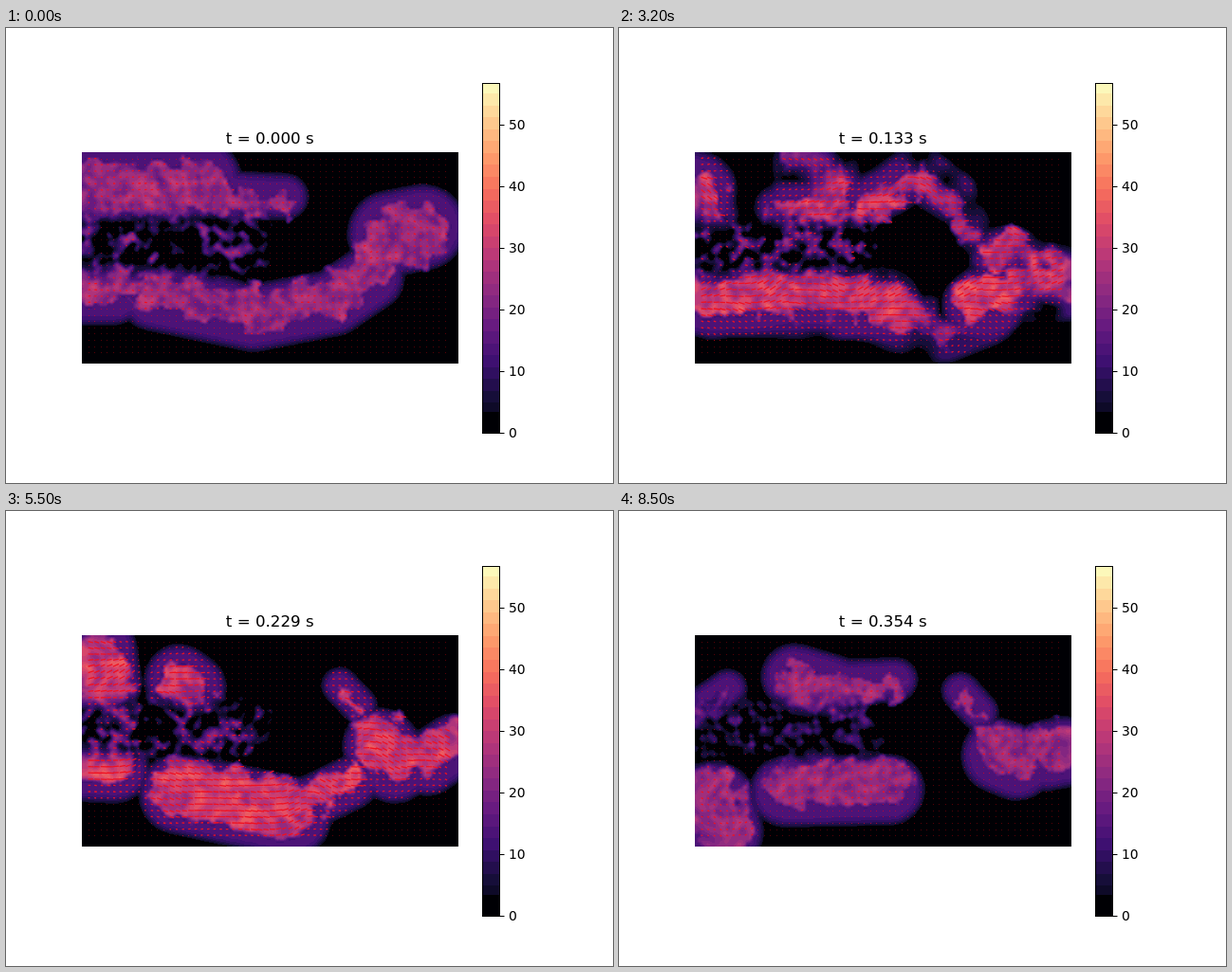
An HTML page with a canvas for the animation above (8600 ms loop, 640x480 px).

```html
<!DOCTYPE html>
<html lang="en">
<head>
<meta charset="utf-8">
<title>Velocity field</title>
<style>
  html, body { margin: 0; width: 100%; height: 100%; overflow: hidden; background: #fff; }
  canvas { position: absolute; left: 80px; top: 131px; }
  svg { position: absolute; left: 0; top: 0; }
  text { font: 13.89px "DejaVu Sans", sans-serif; }
  #clock { font-size: 16.67px; text-anchor: middle; }
</style>
</head>
<body>
<canvas id="plot" width="397" height="223"></canvas>
<svg id="chart" width="640" height="480"><text id="clock" x="278.2" y="122">t = 0.000 s</text></svg>
<script>
const FRAMES = 86, STEP = 100, RATE = 240;
const LEFT = 80, UPPER = 131, WIDTH = 397, HEIGHT = 223, CELL = 3, MIDDLE = 228;
const COLS = Math.ceil(WIDTH / CELL), ROWS = Math.ceil(HEIGHT / CELL);
const TOP = 56.7, BLACK = 3.45, BAND = 1.926, OFFSET = 1.14, GAIN = 4.4;

const clamp = (v, lo = 0, hi = 1) => Math.min(hi, Math.max(lo, v));
const mix = (a, b, u) => a + (b - a) * u;
const smooth = u => u * u * (3 - 2 * u);

// Colour scale
const stops = ['000004', '140e36', '3b0f70', '641a80', '8c2981', 'b73779',
  'de4968', 'f7705c', 'fe9f6d', 'fecf92', 'fcfdbf']
  .map(hex => [0, 2, 4].map(i => parseInt(hex.slice(i, i + 2), 16)));

function magma(value) {
  const p = clamp(value / TOP) * 10, i = Math.min(9, Math.floor(p));
  return stops[i].map((c, k) => Math.round(mix(c, stops[i + 1][k], p - i)));
}
const edge = k => OFFSET + k * BAND;
const banded = v => v < BLACK ? stops[0] : magma(edge(Math.floor((v - OFFSET) / BAND) + 0.5));
const palette = Array.from({ length: 256 }, (_, g) => banded(g / GAIN));

// Smooth value noise in x, y and time
function hash(x, y, z) {
  let h = Math.imul(x, 374761393) + Math.imul(y, 668265263) + Math.imul(z, 1274126177);
  h = Math.imul(h ^ (h >>> 13), 1274126177);
  return ((h ^ (h >>> 16)) >>> 0) / 4294967296;
}
function noise(x, y, z) {
  const i = Math.floor(x), j = Math.floor(y), k = Math.floor(z);
  const u = smooth(x - i), v = smooth(y - j), w = smooth(z - k);
  const layer = n => mix(
    mix(hash(i, j, n), hash(i + 1, j, n), u),
    mix(hash(i, j + 1, n), hash(i + 1, j + 1, n), u), v);
  return mix(layer(k), layer(k + 1), w);
}
// Turned axes hide the lattice
const grainAt = (x, y, z, size) => noise((x * 0.8 + y * 0.6) / size, (y * 0.8 - x * 0.6) / size, z);

function canvasOf(width, height) {
  const canvas = document.createElement('canvas');
  canvas.width = width;
  canvas.height = height;
  return canvas.getContext('2d', { willReadFrequently: true });
}

// Mask of thick ridges; rims are [extra width, strength], weakest first
function maskOf(ridges, shift, rims) {
  const c = canvasOf(COLS, ROWS);
  c.fillRect(0, 0, COLS, ROWS);
  c.scale(1 / CELL, 1 / CELL);
  c.translate(-LEFT, -UPPER);
  c.lineJoin = c.lineCap = 'round';
  for (const [extra, strength] of rims) {
    c.strokeStyle = `rgb(${strength * 255},0,0)`;
    for (const [width, ...points] of ridges) {
      const dy = points[1] < MIDDLE ? -shift : shift;
      c.lineWidth = width + extra;
      c.beginPath();
      for (let i = 0; i < points.length; i += 2) c.lineTo(points[i], points[i + 1] + dy);
      c.stroke();
    }
  }
  const { data } = c.getImageData(0, 0, COLS, ROWS);
  return Float32Array.from({ length: COLS * ROWS }, (_, i) => data[i * 4] / 255);
}

// A pose is a few fast streams, each a width and the points of its centre line
const pose = (frame, ...ridges) => ({
  frame,
  core: maskOf(ridges, 0, [[4, 0.6], [-2, 1]]),
  halo: maskOf(ridges, 8, [[32, 0.3], [27, 0.6], [21, 0.85], [14, 1]]),
});

const poses = [
  pose(0, [58, 80, 172, 205, 168], [20, 215, 182, 295, 186], [50, 80, 266, 112, 266],
    [42, 155, 276, 260, 298, 345, 282, 385, 255], [62, 405, 225, 440, 218]),
  pose(10, [66, 112, 180, 165, 180], [40, 190, 195, 255, 200], [46, 80, 262, 170, 275, 305, 287],
    [54, 382, 205, 402, 240], [40, 425, 262, 470, 270], [14, 348, 186, 362, 190]),
  pose(23, [48, 80, 175, 98, 195], [30, 170, 200, 250, 198, 315, 160, 350, 185],
    [14, 350, 185, 390, 245], [50, 80, 278, 280, 284], [46, 378, 284, 470, 265]),
  pose(41, [64, 207, 155, 212, 190], [22, 235, 202, 288, 180], [26, 95, 168, 95, 220],
    [42, 80, 288, 170, 276, 245, 278, 300, 302], [48, 340, 308, 385, 290, 412, 238], [38, 430, 245, 470, 252]),
  pose(55, [48, 100, 155, 105, 190], [46, 183, 186, 195, 195], [44, 85, 262, 115, 264],
    [58, 183, 290, 230, 300, 300, 315], [52, 395, 240, 410, 260], [40, 445, 258, 472, 240],
    [28, 320, 300, 365, 278], [10, 352, 192, 372, 213]),
  pose(71, [28, 170, 200, 185, 185], [24, 292, 180, 250, 175, 264, 225], [24, 90, 200, 115, 205],
    [84, 110, 310, 200, 310], [52, 230, 290, 285, 285], [54, 400, 224, 430, 232], [36, 455, 250, 468, 250]),
  pose(85, [42, 185, 183, 225, 195], [18, 235, 188, 292, 186], [12, 85, 215, 115, 195],
    [60, 100, 300, 108, 330], [46, 175, 288, 285, 286], [50, 400, 250, 420, 258],
    [46, 450, 250, 470, 246], [12, 360, 198, 380, 220]),
];

// Patchy slow wake between the streams, fading at the end
function wakeAt(x, y, frame) {
  const span = Math.exp(-(((y - MIDDLE) / 30) ** 4));
  return span * clamp((285 - x) / 25) * clamp((100 - frame) / 20);
}

// Speed at every cell for one frame
function fieldAt(frame) {
  const next = Math.max(1, poses.findIndex(p => p.frame >= frame));
  const a = poses[next - 1], b = poses[next];
  const u = (frame - a.frame) / (b.frame - a.frame);
  const level = 23 + 7 * Math.sqrt(Math.max(0, Math.sin(Math.PI * frame / (FRAMES - 1))));
  const speed = new Float32Array(COLS * ROWS), z = frame * 0.25;
  for (let j = 0; j < ROWS; j++) {
    for (let i = 0; i < COLS; i++) {
      const x = i - frame * 0.5, here = j * COLS + i;
      const wx = Math.round(i + (grainAt(x, j, z, 4) - 0.5) * 7);
      const wy = Math.round(j + (grainAt(x, j, z + 90, 4) - 0.5) * 7);
      const warped = clamp(wy, 0, ROWS - 1) * COLS + clamp(wx, 0, COLS - 1);
      const w = smooth(clamp(2 * u - noise(x / 9, j / 9, 40)));
      const grain = mix(grainAt(x, j, z + 200, 2.2), grainAt(x, j, z + 300, 4.5), 0.4);

      const core = mix(a.core[warped], b.core[warped], w) * level;
      const halo = mix(a.halo[here], b.halo[here], w) * 13;
      const speckle = clamp(3.2 * (grain - 0.4), 0, 1.3) * 20;
      const stream = Math.max(halo, core * (1 + (grain - 0.5) * 0.8));
      speed[here] = mix(stream, speckle, wakeAt(LEFT + i * CELL, UPPER + j * CELL, frame) * 0.9);
    }
  }
  return { speed, stretch: 2.6 + (level - 23) * 0.45 };
}

const plot = document.getElementById('plot').getContext('2d', { willReadFrequently: true });
const small = canvasOf(COLS, ROWS);

function drawField(speed) {
  const cells = small.createImageData(COLS, ROWS);
  speed.forEach((v, i) => cells.data.set([v * GAIN, 0, 0, 255], i * 4));
  small.putImageData(cells, 0, 0);
  plot.imageSmoothingQuality = 'high';
  plot.drawImage(small.canvas, 0, 0, COLS * CELL, ROWS * CELL);
  const image = plot.getImageData(0, 0, WIDTH, HEIGHT), px = image.data;
  for (let i = 0; i < px.length; i += 4) {
    [px[i], px[i + 1], px[i + 2]] = palette[px[i]];
  }
  plot.putImageData(image, 0, 0);
}

function drawArrows(speed, stretch, frame) {
  plot.strokeStyle = '#f01020';
  plot.lineWidth = 1.3;
  plot.beginPath();
  for (let row = 0; row < 32; row++) {
    for (let col = 0; col < 58; col++) {
      const x = 6.6 + col * 6.6, y = 6.6 + row * 6.6;
      const v = speed[Math.floor(y / CELL) * COLS + Math.floor(x / CELL)];
      const length = v / 28 * stretch;
      if (length < 1.6) {
        plot.fillStyle = v < 4 ? 'rgba(190,0,10,.45)' : 'rgba(230,0,30,.7)';
        plot.fillRect(Math.round(x), Math.round(y), 1, 1);
        continue;
      }
      const angle = (noise(col / 5 - frame * 0.1, row / 5, frame * 0.12 + 300) - 0.5) * 1.5;
      plot.moveTo(x, y);
      plot.lineTo(x + length * Math.cos(angle), y - length * Math.sin(angle));
    }
  }
  plot.stroke();
}

// Colour bar
const chart = document.getElementById('chart');
function add(tag, attributes, text = '') {
  const node = document.createElementNS(chart.namespaceURI, tag);
  for (const name in attributes) node.setAttribute(name, attributes[name]);
  node.textContent = text;
  chart.append(node);
}
const barY = v => 427.7 - v * 6.51;
function addBand(from, to, color) {
  const y = Math.round(barY(to));
  add('rect', { x: 502, y, width: 18, height: Math.round(barY(from)) - y, fill: `rgb(${color})` });
}
addBand(0, BLACK, stops[0]);
for (let k = 1; edge(k) < TOP; k++) {
  addBand(Math.max(BLACK, edge(k)), Math.min(TOP, edge(k + 1)), magma(edge(k + 0.5)));
}
add('rect', { x: 502.5, y: 58.5, width: 18, height: 369, fill: 'none', stroke: '#000' });
for (let v = 0; v <= 50; v += 10) {
  const y = Math.floor(barY(v));
  add('path', { d: `M520.5 ${y + 0.5}h5`, stroke: '#000' });
  add('text', { x: 530, y: y + 5 }, v);
}

const clock = document.getElementById('clock');
const start = performance.now();
let shown = -1;
function tick() {
  const frame = Math.floor((performance.now() - start) / STEP) % FRAMES;
  if (frame !== shown) {
    shown = frame;
    const { speed, stretch } = fieldAt(frame);
    drawField(speed);
    drawArrows(speed, stretch, frame);
    clock.textContent = `t = ${(frame / RATE).toFixed(3)} s`;
  }
  requestAnimationFrame(tick);
}
tick();
</script>
</body>
</html>
```
